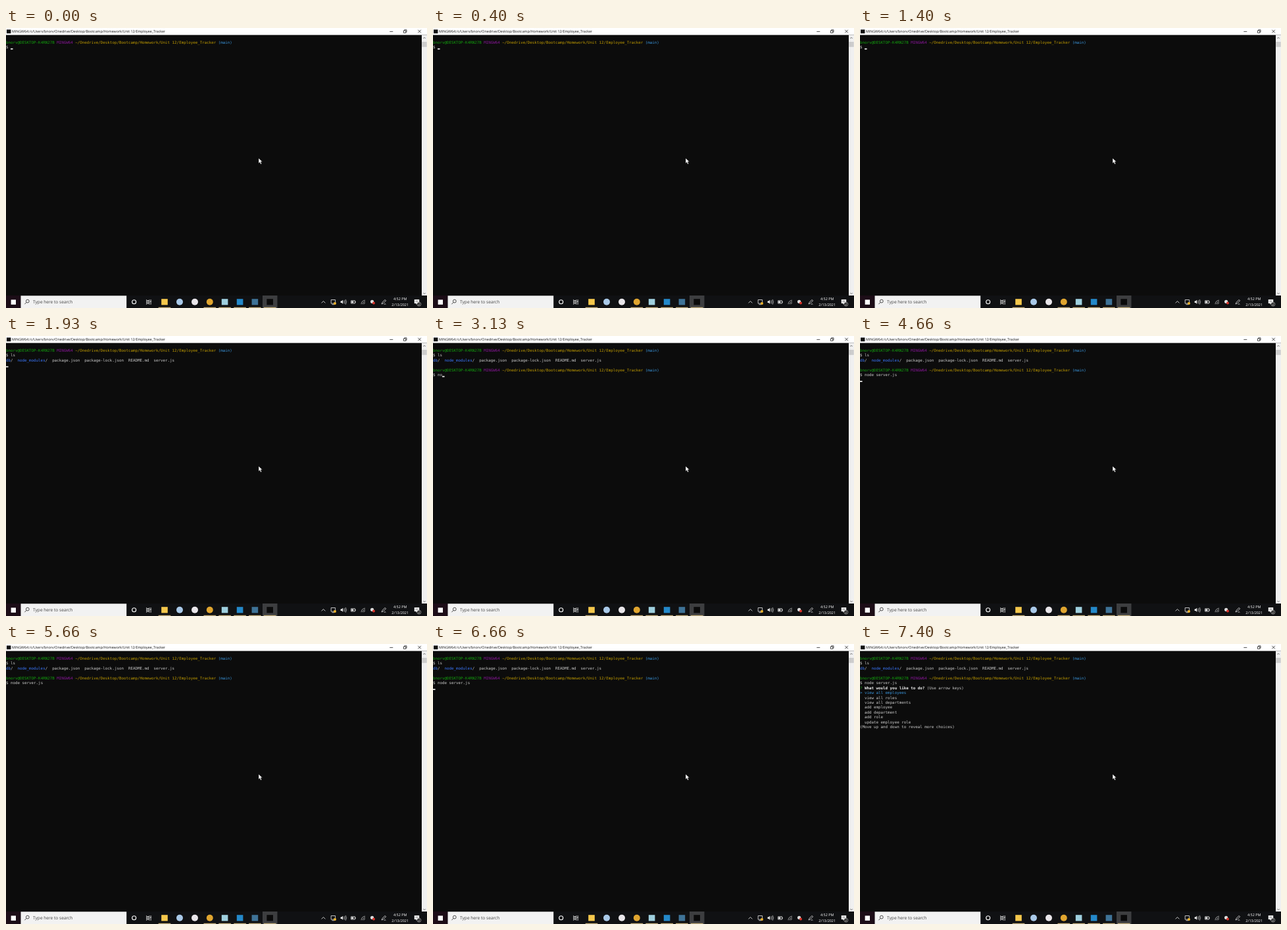
An HTML page for the animation above (8000 ms loop, 640 px wide and 426 px high).

```html
<!DOCTYPE html>
<html lang="en">
<head>
<meta charset="utf-8">
<title>Terminal session</title>
<style>
html, body { margin: 0; width: 100%; height: 100%; overflow: hidden; background: #0c0c0c; }
svg { display: block; width: 640px; height: 426px; }
text { white-space: pre; text-rendering: geometricPrecision; }
#term text { font-family: "DejaVu Sans Mono", monospace; font-size: 5.83px; }
.ui { font-family: "Open Sans", "Noto Sans", sans-serif; }
.line { fill: none; stroke-width: .8; }
</style>
</head>
<body>
<svg viewBox="0 0 640 426" xmlns="http://www.w3.org/2000/svg">
  <rect width="640" height="426" fill="#0c0c0c"/>

  <g id="titlebar">
    <rect width="640" height="10.6" fill="#fff"/>
    <rect x="1" y="2.4" width="6.4" height="5.8" fill="#111"/>
    <text class="ui" x="9" y="7.4" font-size="5.31" fill="#111">MINGW64:/c/Users/bnorv/Onedrive/Desktop/Bootcamp/Homework/Unit 12/Employee_Tracker</text>
    <g class="line" stroke="#222">
      <path d="M583.3 5.4h5M626.3 2.8l4.6 4.6m0-4.6l-4.6 4.6"/>
      <path d="M604.4 4h3.4v3.4h-3.4zM605.6 4v-1.2h3.4v3.4h-1.2"/>
    </g>
  </g>

  <g id="scrollbar">
    <rect x="632" y="10.6" width="8" height="396.6" fill="#f0f0f0"/>
    <rect x="632.3" y="21" width="7.4" height="7.8" fill="#cdcdcd"/>
    <path class="line" stroke="#505050" d="M634.3 16l1.7-1.7l1.7 1.7M634.3 403l1.7 1.7l1.7-1.7"/>
  </g>

  <g id="term"></g>
  <rect id="cursor" width="3.5" height="1.7" fill="#f2f2f2"/>

  <g id="taskbar">
    <rect y="407" width="640" height="19" fill="#101113"/>
    <rect y="407" width="22.5" height="19" fill="#1c0d17"/>
    <rect x="7.6" y="413.4" width="7.4" height="7.4" fill="#fff"/>
    <rect x="22.5" y="407.3" width="160.7" height="18.7" fill="#f2f2f2"/>
    <g class="line" stroke="#222"><circle cx="32.8" cy="415.6" r="2.4"/><path d="M31 417.4l-2.6 2.8"/></g>
    <text class="ui" x="41" y="419.4" font-size="6.6" fill="#444">Type here to search</text>
    <circle cx="194.7" cy="416.8" r="3" fill="none" stroke="#fff" stroke-width="1.1"/>
    <g class="line" stroke="#eee">
      <path d="M213.6 413.2v1.5h4.4v-1.5M213.6 420.6v-1.5h4.4v1.5M213.6 415.9h4.4v2h-4.4zM220.2 413v1.5M220.2 417.8v3"/>
      <rect x="219.7" y="415.2" width="1" height="1.8"/>
    </g>
    <rect x="390" y="407" width="22.5" height="19" fill="#3d3e40"/>
    <g id="apps"></g>
    <g id="open" fill="#c4ad7a"></g>

    <g id="tray">
      <g class="line" stroke="#eee">
        <path d="M479.6 418.4l2.9-2.9l2.9 2.9"/>
        <path d="M494.2 413.5h6.4v5.6h-6.4zM495.5 420.7h3.8"/>
        <path d="M513.3 414.8q1.4 2 0 4M514.8 413.8q2.2 3 0 6M516.3 412.9q2.8 3.9 0 7.8" stroke-width=".6"/>
        <path d="M524.6 414.8h6v4.2h-6zM531.3 416v1.8"/>
        <path d="M540 420.2a6.6 6.6 0 0 1 6-6M542 420.2a4.6 4.6 0 0 1 4-4M544 420.2a2.5 2.5 0 0 1 2-2" stroke="#bbb"/>
        <path d="M571 420l1.3-2.8l3.8-3.8l1.5 1.5l-3.8 3.8zM574.6 420.4q1.8-1.4 2.8 0"/>
      </g>
      <path d="M508.6 415.6h1.5l2-1.8v6l-2-1.8h-1.5z" fill="#eee"/>
      <rect x="525.3" y="415.5" width="3" height="2.8" fill="#eee"/>
      <circle cx="500" cy="418.9" r="2" fill="#f0b429"/>
      <circle cx="556.6" cy="416.3" r="2.6" fill="#ddd"/>
      <circle cx="559" cy="418.6" r="2" fill="#d9342b"/>
      <g class="ui" font-size="5.45" fill="#fff" text-anchor="middle">
        <text x="599.2" y="414.2">4:52 PM</text>
        <text x="599.2" y="423.2">2/13/2021</text>
      </g>
      <path d="M620.8 413h7.4v6h-3l-1.7 1.8v-1.8h-2.7z" fill="#fff"/>
      <path d="M622.3 414.8h4.4M622.3 416.6h4.4" stroke="#333" stroke-width=".5"/>
      <circle cx="627.9" cy="420.2" r="3" fill="#222" stroke="#ddd" stroke-width=".5"/>
      <text class="ui" x="627.9" y="421.9" font-size="4.6" fill="#fff" text-anchor="middle">2</text>
    </g>
  </g>

  <path d="M384 198v7.9l1.8-1.7l1.3 3l1.5-.7l-1.3-2.9h2.5z" fill="#fff" stroke="#000" stroke-width=".4"/>
</svg>
<script>
const LOOP = 8000, CHAR = 3.508, ROW = 7.463, BASE = 23.8;
const NS = "http://www.w3.org/2000/svg";
const GREY = "#cccccc", GREEN = "#13a10e", PURPLE = "#881798",
      GOLD = "#c19c00", CYAN = "#3a96dd", BLUE = "#3b78ff", WHITE = "#f2f2f2";
const $ = id => document.getElementById(id);

function add(parent, tag, attrs, text) {
  const el = document.createElementNS(NS, tag);
  for (const k in attrs) el.setAttribute(k, attrs[k]);
  if (text) el.textContent = text;
  parent.appendChild(el);
  return el;
}

// Writes [text, colour, weight] runs on one terminal row.
function write(parent, row, ...runs) {
  let col = 0;
  for (const [str, fill = GREY, weight = "normal"] of runs) {
    add(parent, "text", { x: col * CHAR, y: BASE + row * ROW, fill, "font-weight": weight }, str);
    col += str.length;
  }
}

function prompt(g, row) {
  write(g, row, ["bnorv@DESKTOP-K4RN27B ", GREEN], ["MINGW64 ", PURPLE],
    ["~/Onedrive/Desktop/Bootcamp/Homework/Unit 12/Employee_Tracker ", GOLD], ["(main)", CYAN]);
}

const term = $("term");
const block = () => add(term, "g", {});
const typed = row => add(term, "text", { x: 0, y: BASE + row * ROW, fill: GREY });

prompt(term, 0);
const cmd1 = typed(1);
const listing = block();
write(listing, 2, ["db", BLUE], ["/  "], ["node_modules", BLUE],
  ["/  package.json  package-lock.json  README.md  server.js"]);
const prompt2 = block();
prompt(prompt2, 4);
const cmd2 = typed(5);
const menu = block();
write(menu, 6, ["? ", GREEN], ["What would you like to do? ", WHITE, "bold"], ["(Use arrow keys)"]);
write(menu, 7, ["> view all employees", CYAN]);
["view all roles", "view all departments", "add employee", "add department", "add role", "update employee role"]
  .forEach((s, i) => write(menu, 8 + i, ["  " + s]));
write(menu, 14, ["(Move up and down to reveal more choices)"]);

// Taskbar apps: centre, shape, colour.
const apps = [
  [241, "box", "#f5c84c"], [264, "dot", "#a9c9e8"], [287, "dot", "#e9e6ea"],
  [309.8, "dot", "#e0a52f"], [332.6, "box", "#9fd0df"], [355.6, "box", "#2489ca"],
  [378.4, "box", "#3f7397"], [401.2, "box", "#0a0a0a"]
];
for (const [x, shape, fill] of apps) {
  if (shape === "dot") add($("apps"), "circle", { cx: x, cy: 416.8, r: 5, fill });
  else add($("apps"), "rect", { x: x - 4.8, y: 412.2, width: 9.6, height: 9.2, fill });
}
for (const i of [0, 3, 4, 5, 6, 7])
  add($("open"), "rect", { x: apps[i][0] - 9.3, y: 424.8, width: 18.6, height: 1.2 });

const keys1 = [[1530, "l"], [1660, "ls"]];
const keys2 = [[2860, "n"], [3130, "no"], [3260, "nod"], [3530, "node"], [3600, "node "],
  [3800, "node s"], [3930, "node se"], [4060, "node ser"], [4260, "node server.js "]];
const ENTER1 = 1800, LIST = 1860, PROMPT = 2330, ENTER2 = 4660, MENU = 7400;
// Spans in which the cursor is dark.
const dark = [[930, 1400], [2730, 2860], [5000, 5060], [5660, 6200], [6730, 7330], [MENU, LOOP]];

const last = (keys, t) => keys.reduce((s, [at, str]) => t >= at ? str : s, "");
const show = (el, on) => el.setAttribute("visibility", on ? "visible" : "hidden");

function draw(t) {
  const a = "$ " + last(keys1, t), b = "$ " + last(keys2, t);
  cmd1.textContent = a;
  cmd2.textContent = t >= PROMPT ? b : "";
  show(listing, t >= LIST);
  show(prompt2, t >= PROMPT);
  show(menu, t >= MENU);

  let row = 1, col = a.length;
  if (t >= ENTER2) [row, col] = [6, 0];
  else if (t >= PROMPT) [row, col] = [5, b.length];
  else if (t >= ENTER1) [row, col] = [t >= LIST ? 3 : 2, 0];
  const cur = $("cursor");
  cur.setAttribute("x", col * CHAR);
  cur.setAttribute("y", BASE + row * ROW - .3);
  show(cur, !dark.some(([from, to]) => t >= from && t < to));
}

const start = performance.now();
function tick(now) {
  draw(Math.max(0, now - start) % LOOP);
  requestAnimationFrame(tick);
}
draw(0);
requestAnimationFrame(tick);
</script>
</body>
</html>
```
